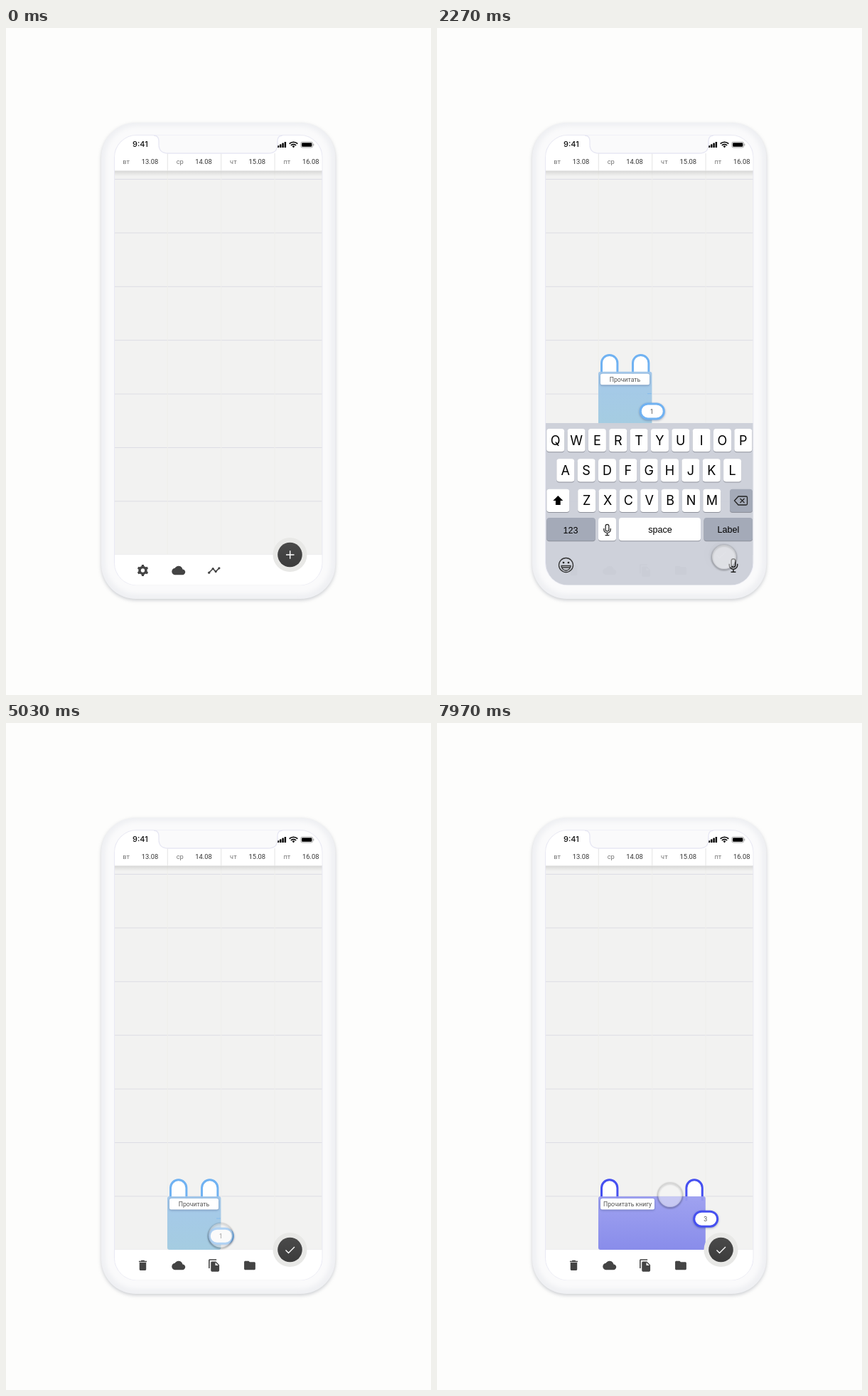
An HTML page that plays this animation: 598x937 px, repeating every 8000 ms.

```html
<!DOCTYPE html>
<html lang="ru">
<head>
<meta charset="utf-8">
<title>Планировщик</title>
<style>
  html, body { margin: 0; width: 100%; height: 100%; overflow: hidden; background: #fdfdfc; }
  svg { display: block; width: 100%; height: 100%; }
  text { font-family: Roboto, sans-serif; }
  .phone { filter: drop-shadow(.5px 2.5px 2.5px rgba(100, 105, 120, .32)); }
  .key { filter: drop-shadow(0 1px 0 #8d909a); }
  .glyph { font-family: Inter, sans-serif; text-anchor: middle; }
  .word { font-family: "Liberation Sans", Arial, sans-serif; text-anchor: middle; }
  .soft { filter: drop-shadow(0 1px 1.5px rgba(40, 60, 110, .4)); }
  .mid { text-anchor: middle; }
</style>
</head>
<body>
<svg viewBox="0 0 598 937">
  <defs>
    <clipPath id="screen"><rect x="153" y="151" width="291.500" height="631.500" rx="31"/></clipPath>
    <filter id="blur" x="-10%" y="-10%" width="120%" height="120%"><feGaussianBlur stdDeviation="3"/></filter>
    <filter id="haze" x="-30%" y="-30%" width="160%" height="160%"><feGaussianBlur stdDeviation="1.1"/></filter>
    <linearGradient id="shade" x2="0" y2="1">
      <stop stop-color="#000" stop-opacity=".12"/><stop offset="1" stop-color="#000" stop-opacity="0"/>
    </linearGradient>
    <linearGradient id="fabFill" x2="0" y2="1"><stop stop-color="#4a4a4a"/><stop offset="1" stop-color="#3c3c3c"/></linearGradient>
    <linearGradient id="bagFill" x2="0" y2="1"><stop id="bagTop"/><stop id="bagLow" offset="1"/></linearGradient>
  </defs>
  <rect width="598" height="937" fill="#fdfdfc"/>
  <rect class="phone" x="134" y="133" width="329.500" height="669" rx="49" fill="#eff0f3"/>
  <rect x="140" y="138" width="317" height="657" rx="44" fill="#fafafb" filter="url(#blur)"/>
  <rect x="153" y="151" width="291.500" height="631" rx="31" fill="none" stroke="#e9e9f4" stroke-width="2"/>
  <g clip-path="url(#screen)">
    <rect x="153" y="150" width="292" height="633" fill="#f2f2f1"/>
    <g id="grid"></g>
    <rect x="153" y="740" width="292" height="43" fill="#fff"/>
    <g id="bag">
      <g id="handles" fill="#fff" stroke-width="3">
        <path d="M231.500 671V653a11.200 11.200 0 0 1 22.400 0V671"/>
        <path id="armR" d="M275.500 671V653a11.200 11.200 0 0 1 22.400 0V671"/>
      </g>
      <rect id="body" x="227" y="665" height="75" rx="3" fill="url(#bagFill)" opacity=".94"/>
      <path id="tick" d="M296 696h6" stroke-width="1" opacity=".6"/>
      <g class="soft">
        <rect id="label" x="230" y="668" height="15.500" rx="2.500" fill="#fff"/>
      </g>
      <text id="title" class="mid" y="679" font-size="8.700" fill="#555"></text>
      <g id="pill">
        <rect class="soft" id="pillBox" x="-16.500" y="-10.500" width="33" height="21" rx="10.500" fill="#fff" stroke-width="3"/>
        <text id="count" class="mid" x="-.5" y="3.200" font-size="9" fill="#555"></text>
      </g>
    </g>
    <g id="navA" fill="#444"></g>
    <g id="navB" fill="#444"></g>
    <circle id="ring" cx="399.500" cy="740" r="24"/>
    <circle cx="399.500" cy="740" r="17.300" fill="url(#fabFill)"/>
    <g fill="none" stroke="#fff" stroke-width="1.400">
      <path id="plus" d="M394 740h11.500M399.700 734.300v11.500"/>
      <path id="check" d="M393.500 740.500l4 4 8.500-8.500"/>
    </g>
    <g id="board"></g>
    <g id="head"></g>
  </g>
  <path d="M208 150.500q7 1 7 8.500v4.500q0 12.500 13 12.500h141q13 0 13-12.500V159q0-7.500 7-8.500z" fill="#fafafb"/>
  <path d="M208 151q7 0 7 8v4.500q0 12.500 13 12.500h141q13 0 13-12.500V159q0-8 7-8" fill="none" stroke="#e7e7f3" stroke-width="1.300"/>
  <g id="touch">
    <circle r="17" cy="1" fill="none" stroke="#000" stroke-opacity=".35" stroke-width="1.800" filter="url(#haze)"/>
    <circle r="17" fill="#f4f4f4" fill-opacity=".48"/>
  </g>
</svg>
<script>
const LOOP = 8000, CELL = 75.4;
const $ = id => document.getElementById(id);
const set = (id, attrs) => { for (const k in attrs) $(id).setAttribute(k, attrs[k]); };
const range = n => [...Array(n).keys()];
const mix = (a, b, u) => a + (b - a) * u;
const ease = (t, from, to) => {
  const u = Math.min(1, Math.max(0, (t - from) / (to - from)));
  return u * u * (3 - 2 * u);
};
const rgb = (a, b, u) => `rgb(${a.map((v, i) => Math.round(mix(v, b[i], u)))})`;

// Calendar grid and header
$('grid').innerHTML =
  range(8).map(i => `<path d="M153 ${212.5 + i * CELL}h292" stroke="#dddde4"/>`).join('') +
  range(3).map(i => `<path d="M${227.3 + i * CELL} 200v540" stroke="#eeeeec"/>`).join('');

const days = ['вт', 'ср', 'чт', 'пт'];
$('head').innerHTML = `
  <rect x="153" y="200" width="292" height="8" fill="url(#shade)"/>
  <rect x="153" y="150" width="292" height="50.500" fill="#fff"/>` +
  days.map((d, i) => {
    const x = 164.3 + i * CELL;
    return `<text x="${x}" y="190.700" font-size="9.300" fill="#777">${d}</text>
      <text x="${x + 26.5}" y="190.700" font-size="9.400" fill="#333">${13 + i}.08</text>` +
      (i ? `<path d="M${x - 12.4} 176v24.500" stroke="#e4e4e4"/>` : '');
  }).join('') + `
  <text x="178" y="167" font-size="11" font-weight="500" fill="#111" style="font-family:Inter,sans-serif">9:41</text>` +
  range(4).map(i => `<rect x="${381.8 + i * 3.3}" y="${165 - i * 1.7}" width="2.400" height="${3 + i * 1.7}" rx=".6"/>`).join('') + `
  <g fill="none" stroke="#000" stroke-width="1.700">
    <path d="M398.700 162.600a8.300 8.300 0 0 1 11.600 0M400.900 165a5 5 0 0 1 7.200 0"/>
  </g>
  <path d="M402.600 166.300a2.700 2.700 0 0 1 3.800 0l-1.900 2z"/>
  <rect x="414.700" y="160" width="17" height="8" rx="2.400" fill="none" stroke="#999" stroke-width=".8"/>
  <rect x="416" y="161.300" width="14.400" height="5.400" rx="1.300"/>
  <path d="M432.800 162.700v2.600" stroke="#999"/>`;

// Bottom bar icons on a 24-unit box
const icon = (x, shape) => `<g transform="translate(${x - 9.5} 752.500) scale(.79)">${shape}</g>`;
const path = d => `<path d="${d}"/>`;
const cloud = path('M19.35 10.04C18.67 6.59 15.64 4 12 4 9.11 4 6.6 5.64 5.35 8.04 2.34 8.36 0 10.91 0 14c0 3.31 2.69 6 6 6h13c2.76 0 5-2.24 5-5 0-2.64-2.05-4.78-4.65-4.96z');
const gear = '<circle cx="12" cy="12" r="5.600" fill="none" stroke="#444" stroke-width="4.400"/>' +
  range(6).map(i => `<path d="M9.500 5.500l.6-3.500h3.800l.6 3.500z" transform="rotate(${i * 60} 12 12)"/>`).join('');
const knots = [[3, 16], [10, 9], [15, 14], [21, 8]];
const chart = `<polyline points="${knots}" fill="none" stroke="#444" stroke-width="2"/>` +
  knots.map(([x, y]) => `<circle cx="${x}" cy="${y}" r="2"/>`).join('');
const trash = path('M6 19c0 1.1.9 2 2 2h8c1.1 0 2-.9 2-2V7H6v12zM19 4h-3.5l-1-1h-5l-1 1H5v2h14V4z');
const copy = path('M16 1H4c-1.1 0-2 .9-2 2v14h2V3h12V1zm-1 4l6 6v10c0 1.1-.9 2-2 2H7.99C6.89 23 6 22.1 6 21l.01-14c0-1.1.89-2 1.99-2h7zm-1 7h5.5L14 6.5V12z');
const folder = path('M10 4H4c-1.1 0-2 .9-2 2v12c0 1.1.9 2 2 2h16c1.1 0 2-.9 2-2V8c0-1.1-.9-2-2-2h-8l-2-2z');
$('navA').innerHTML = icon(192.5, gear) + icon(242.8, cloud) + icon(292.8, chart);
$('navB').innerHTML = icon(192.5, trash) + icon(242.8, cloud) + icon(293, copy) + icon(343, folder);

// Keyboard, drawn in its open place
const GREY = '#a4aab8';
const key = (x, y, w, fill, inner) =>
  `<rect class="key" x="${x}" y="${y}" width="${w}" height="32.300" rx="3.800" fill="${fill}"/>${inner}`;
const row = (letters, x, y) => [...letters].map((c, i) => {
  const left = x + i * 29.35;
  return key(left, y, 25, '#fff', `<text class="glyph" x="${left + 12.5}" y="${y + 22.6}" font-size="18">${c}</text>`);
}).join('');
const word = (s, x, y) => `<text class="word" x="${x}" y="${y}" font-size="12.600">${s}</text>`;
const mic = (x, y, k) => `<g transform="translate(${x} ${y}) scale(${k})" fill="none" stroke="#222" stroke-width="1.300">
  <rect x="-2.500" y="-8" width="5" height="10" rx="2.500"/><path d="M-5-2v1.500a5 5 0 0 0 10 0V-2M0 4.500V8M-3 8h6"/></g>`;
$('board').innerHTML = `
  <rect x="153" y="555" width="292" height="230" fill="#cdd0da" opacity=".975"/>` +
  row('QWERTYUIOP', 154.2, 563) + row('ASDFGHJKL', 168.3, 605.3) + row('ZXCVBNM', 198.2, 647.7) +
  key(154.3, 647.7, 32, '#fff', '<path d="M170.300 657l7 7h-3.600v6h-6.800v-6h-3.600z"/>') +
  key(412, 647.7, 32, GREY, `<g fill="none" stroke="#222" stroke-width="1.300">
    <path d="M418.500 664l5.500-6h11q1.500 0 1.500 1.500v9q0 1.500-1.500 1.500h-11zM426.500 661l6 6M432.500 661l-6 6"/></g>`) +
  key(154.3, 688, 68.5, GREY, word(123, 188, 710)) +
  key(227, 688, 25, '#fff', mic(239.5, 705, .95)) +
  key(256, 688, 115, '#fff', word('space', 314, 708.5)) +
  key(375.5, 688, 68.5, GREY, word('Label', 410, 708.5)) + `
  <g fill="none" stroke="#333" stroke-width="1.300"><circle cx="181.500" cy="754.500" r="10"/>
    <path d="M175 755.500h13a6.500 6.500 0 0 1-13 0zM176 758h11"/></g>
  <circle cx="178" cy="751" r="1.300"/><circle cx="185" cy="751" r="1.300"/>` +
  mic(417, 755, 1.15);

// Touch point: [start, end, x, y] moves after the first place
const moves = [
  [2330, 2850, 411, 712],
  [3950, 4700, 302, 720],
  [4980, 5700, 302, 696],
  [6020, 6600, 286, 659],
  [6900, 7750, 328, 663]
];
function touchAt(t) {
  let x = mix(402, 404, ease(t, 1500, 1800)), y = 743;
  for (const [a, b, tx, ty] of moves) {
    const u = ease(t, a, b);
    x = mix(x, tx, u);
    y = mix(y, ty, u);
  }
  return [x, y];
}

function draw(t) {
  const open = ease(t, 1720, 2180) - ease(t, 3022, 3502);
  const made = ease(t, 1700, 1880);
  const level = ease(t, 5220, 5360) + ease(t, 5460, 5600);
  const wide = ease(t, 7400, 7700);
  const press = ease(t, 1300, 1450) - ease(t, 1560, 1720);
  const grow = CELL * wide, hue = level / 2;

  set('board', { transform: `translate(0 ${(1 - open) * 231})`, visibility: open > 0 ? 'visible' : 'hidden' });
  set('bag', { transform: `translate(0 ${-182.3 * open})`, opacity: made });
  set('navA', { opacity: 1 - made });
  set('navB', { opacity: made });
  set('plus', { opacity: 1 - made });
  set('check', { opacity: made });
  set('ring', { fill: rgb([232, 232, 230], [247, 247, 247], press), class: press > .05 ? 'soft' : '' });

  const line = rgb([112, 178, 242], [70, 80, 240], hue);
  set('handles', { stroke: line });
  set('tick', { stroke: line, transform: `translate(${grow} 0)` });
  set('pillBox', { stroke: line });
  set('bagTop', { 'stop-color': rgb([160, 198, 234], [154, 157, 240], hue) });
  set('bagLow', { 'stop-color': rgb([160, 202, 224], [130, 134, 234], hue) });
  set('body', { width: CELL + grow });
  set('armR', { transform: `translate(${grow} 0)` });

  const labelW = 69 + 7 * wide;
  set('label', { width: labelW });
  set('title', { x: 230 + labelW / 2 });
  $('title').textContent = wide > .3 ? 'Прочитать книгу' : 'Прочитать';
  set('pill', { transform: `translate(${302.8 + grow} ${720.7 - 12 * level})` });
  $('count').textContent = 1 + Math.round(level);

  const [x, y] = touchAt(t);
  set('touch', { opacity: ease(t, 1150, 1400), transform: `translate(${x} ${y}) scale(${1 - .12 * press})` });
}

const start = performance.now();
function tick(now) {
  draw(Math.max(0, now - start) % LOOP);
  requestAnimationFrame(tick);
}
draw(0);
requestAnimationFrame(tick);
</script>
</body>
</html>
```
